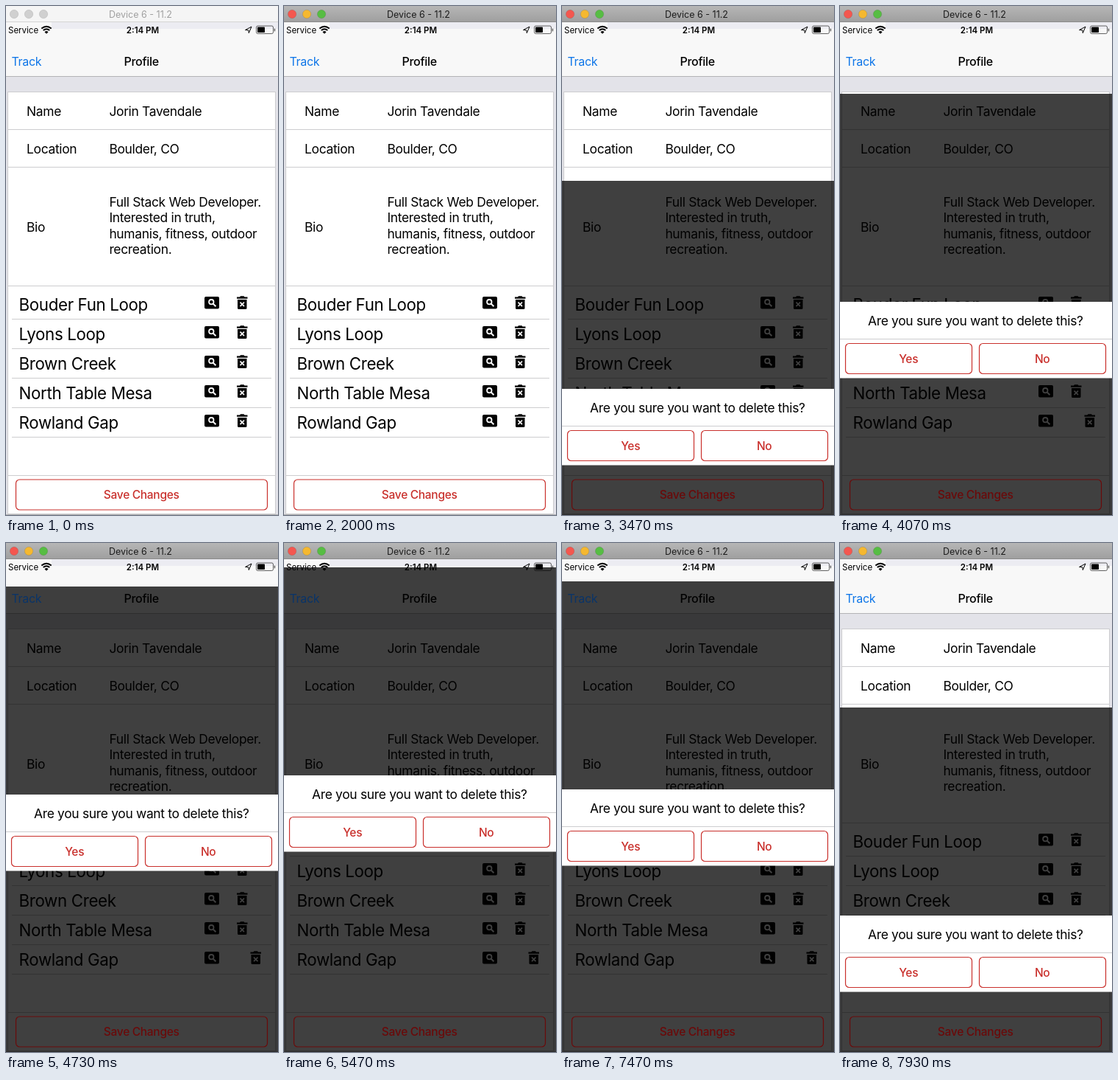
Animation of 370 by 690 pixels, one loop 8 s. Source, as an HTML page:

```html
<!DOCTYPE html>
<html lang="en">
<head>
<meta charset="utf-8">
<title>Profile screen</title>
<style>
  html, body { margin: 0; width: 100%; height: 100%; overflow: hidden; background: #fff; }
  svg { display: block; width: 370px; height: 690px; }
  text { font: 17.4px Inter, "Liberation Sans", sans-serif; letter-spacing: -.3px; }
  .row { font-size: 22.3px; letter-spacing: -.35px; }
  .button { font-size: 15.5px; font-weight: 500; }
  .nav { font-size: 16px; }
  .heading { font-weight: 500; }
  .status { font-size: 11.5px; letter-spacing: 0; }
  .clock { font-weight: 600; }
  .title { font-size: 12.5px; letter-spacing: 0; }
  .mid { text-anchor: middle; }
</style>
</head>
<body>
<svg id="stage" viewBox="0 0 370 690"></svg>
<script>
const LOOP = 8000, HEIGHT = 690, SHEET_TOP = 22, DIALOG_OFFSET = 282;
const ACTIVATE = 330, OPEN = 2088, CLOSE = 7268;
const RED = '#c9302c';

const lit = { bg: '#fff', bar: '#f8f8f8', strip: '#ececf2', band: '#e3e3e9', line: '#cdcdcf',
              barLine: '#b4b4b6', ink: '#000', red: RED, blue: '#0f76e8' };
const dim = { bg: '#404040', bar: '#3e3e3e', strip: '#3b3b3c', band: '#39393a', line: '#333',
              barLine: '#2d2d2d', ink: '#000', red: '#6a0a0a', blue: '#0a3468' };

const rect = (x, y, w, h, fill, extra = '') =>
  `<rect x="${x}" y="${y}" width="${w}" height="${h}" fill="${fill}" ${extra}/>`;
const text = (x, y, str, fill, cls = '') =>
  `<text x="${x}" y="${y}" fill="${fill}" class="${cls}">${str}</text>`;
const button = (x, y, w, h, label, color) =>
  rect(x, y, w, h, 'none', `rx="5" stroke="${color}" stroke-width="1.2"`) +
  text(x + w / 2 - .3, y + h / 2 + 5.5, label, color, 'button mid');

const viewIcon = (y, c) => `<g transform="translate(270 ${y})">
  ${rect(0, 0, 20, 16.5, c.ink, 'rx="2"')}
  <circle cx="9.3" cy="7.2" r="3.2" fill="none" stroke="${c.bg}" stroke-width="1.8"/>
  <path d="M11.6 9.5L15.4 13.3" stroke="${c.bg}" stroke-width="2"/></g>`;

const trashIcon = (y, c, cls) => `<g transform="translate(314 ${y})"><g class="${cls}">
  <path d="M0 1.5H4L5 .2H9.5L10.5 1.5H14.5V3.7H0ZM1 5H13.5V16.5Q13.5 18 12 18H2.5Q1 18 1 16.5Z" fill="${c.ink}"/>
  <path d="M4.5 8.7L10 14.2M10 8.7L4.5 14.2" stroke="${c.bg}" stroke-width="1.7"/></g></g>`;

function statusBar(c) {
  return rect(62, 22, 308, 9, c.strip) +
    text(3, 36.5, 'Service', c.ink, 'status') +
    `<path d="M48.3 30.5Q55 24.9 61.7 30.5M50.7 33.1Q55 29.6 59.3 33.1"
      fill="none" stroke="${c.ink}" stroke-width="1.9"/>
    <path d="M52.5 35.2Q55 33 57.5 35.2L55 37.8Z" fill="${c.ink}"/>` +
    text(186, 36.5, '2:14 PM', c.ink, 'status clock mid') +
    `<path d="M325.5 32.5L334 28L330.3 36.6L329.8 32.8Z" fill="none" stroke="${c.ink}"/>` +
    rect(340.5, 27, 23, 10.5, 'none', `rx="2" stroke="${c.ink}" stroke-opacity=".6"`) +
    rect(342, 28.5, 10, 7.5, c.ink, 'rx=".8"') +
    rect(364.7, 30.5, 1.5, 4, c.ink, 'rx=".7" opacity=".6"');
}

function screen(c) {
  const trails = ['Bouder Fun Loop', 'Lyons Loop', 'Brown Creek', 'North Table Mesa', 'Rowland Gap'];
  const bio = ['Full Stack Web Developer.', 'Interested in truth,', 'humanis, fitness, outdoor', 'recreation.'];
  const label = (y, str) => text(28, y, str, c.ink);
  const value = (y, str) => text(140.4, y, str, c.ink);
  return rect(0, 0, 370, HEIGHT, c.band) +
    rect(0, 22, 370, 73, c.bar) + rect(0, 95, 370, 1, c.barLine) +
    statusBar(c) +
    text(7.4, 80.5, 'Track', c.blue, 'nav') +
    text(184.2, 80.5, 'Profile', c.ink, 'nav heading mid') +
    rect(2.5, 116.5, 364, 572, c.bg, `stroke="${c.line}"`) +
    [167, 218, 379, 636].map(y => rect(2, y, 365, 1, c.line)).join('') +
    label(149.3, 'Name') + value(148.8, 'Jorin Tavendale') +
    label(200.3, 'Location') + value(199.8, 'Boulder, CO') +
    label(306.3, 'Bio') + bio.map((line, i) => value(271.5 + i * 21.5, line)).join('') +
    trails.map((name, i) => {
      const y = 40 * i;
      return text(17.6, 413 + y, name, c.ink, 'row') + viewIcon(394 + y, c) +
        trashIcon(393 + y, c, i === 4 ? 'last-trash' : '') + rect(8, 424 + y, 353, 1, c.line);
    }).join('') +
    button(13.5, 642, 342, 41, 'Save Changes', c.red) +
    rect(0, 689, 370, 1, c.barLine);
}

const dialog = rect(0, 0, 370, 103.5, '#fff') + rect(0, 50, 370, 1, '#cdcdcf') +
  text(184.3, 32, 'Are you sure you want to delete this?', '#000', 'mid') +
  button(7.5, 56.5, 172, 41, 'Yes', RED) + button(189.5, 56.5, 172, 41, 'No', RED);

function titleBar(active) {
  const lights = active ? ['#f4574f', '#f5b830', '#57bd43'] : Array(3).fill('#d0d0d0');
  return rect(0, 0, 370, 22, active ? 'url(#chrome)' : '#f5f5f5') +
    rect(0, 21, 370, 1, active ? '#8c8c8c' : '#d4d4d4') +
    lights.map((fill, i) => `<circle cx="${11 + 20 * i}" cy="11" r="5.7" fill="${fill}"
      stroke="#000" stroke-opacity=".15" stroke-width=".7"/>`).join('') +
    text(183, 15.8, 'Device 6 - 11.2', active ? '#1c1c1c' : '#a0a0a0', 'title mid');
}

const stage = document.getElementById('stage');
stage.innerHTML = `<defs>
    <linearGradient id="chrome" x2="0" y2="1"><stop stop-color="#b6b6b6"/><stop offset="1" stop-color="#9e9e9e"/></linearGradient>
    <clipPath id="sheet"><rect id="sheetArea" width="370" height="690"/></clipPath>
  </defs>
  ${screen(lit)}
  <g clip-path="url(#sheet)">${screen(dim)}</g>
  <g id="dialog">${dialog}</g>
  <g id="inactive">${titleBar(false)}</g><g id="active">${titleBar(true)}</g>`;

const el = id => document.getElementById(id);
const sheetArea = el('sheetArea'), dialogBox = el('dialog'), activeBar = el('active');
const lastTrash = stage.querySelectorAll('.last-trash');

// Remaining distance of a damped spring, from 1 to 0.
function spring(ms) {
  const s = Math.max(0, ms), u = .00163 * s + 4.48e-8 * s * s;
  return (1 + u) * Math.exp(-u);
}

function draw(t) {
  const away = t < CLOSE ? spring(t - OPEN) : 1 - spring(t - CLOSE);
  const top = Math.round(SHEET_TOP + (HEIGHT - SHEET_TOP) * away);
  sheetArea.setAttribute('y', top);
  dialogBox.setAttribute('transform', `translate(0 ${top + DIALOG_OFFSET})`);
  activeBar.setAttribute('visibility', t >= ACTIVATE ? 'visible' : 'hidden');
  const shift = t >= OPEN ? 18.5 : 0;
  lastTrash.forEach(icon => icon.setAttribute('transform', `translate(${shift} 0)`));
}

const start = performance.now();
function frame() {
  draw((performance.now() - start) % LOOP);
  requestAnimationFrame(frame);
}
frame();
</script>
</body>
</html>
```
